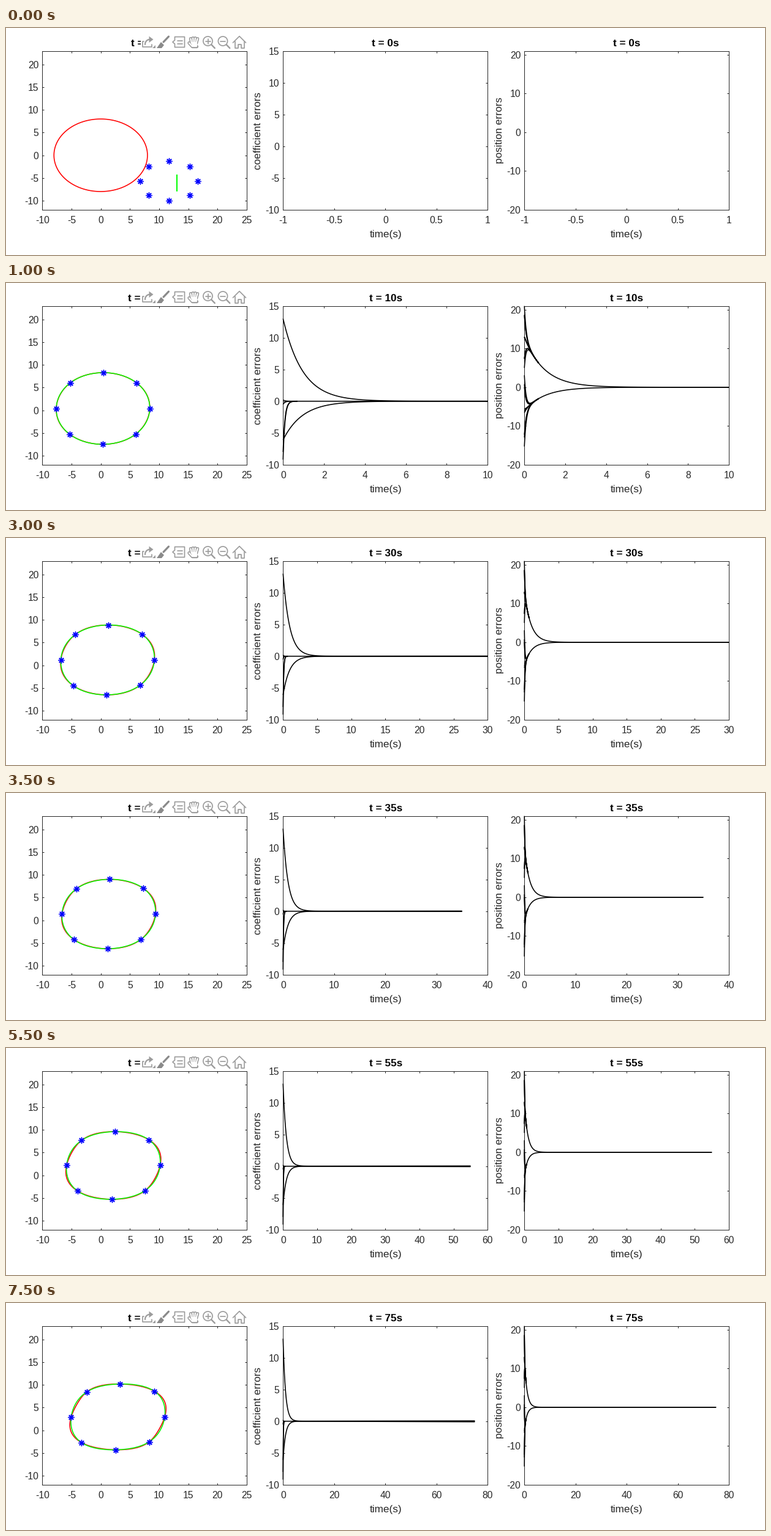
Animation of 1239x372 px, one loop 8000 ms. Source, as a matplotlib script:

```python
import math

import matplotlib.pyplot as plt
import numpy as np
from matplotlib.animation import FuncAnimation
from matplotlib.patches import Circle, Polygon, Rectangle

W, H, DPI = 1239, 372, 64
PX = 72 / DPI  # points per pixel
FRAMES, INTERVAL, STEP = 16, 500, 5
INK, GREY = "#262626", "#9c9c9c"
TICK, LABEL, HAIR = 15.6 * PX, 17.1 * PX, .99 * PX

RADIUS = 8
SLOW, FAST = 1.05, 11  # decay rates of the errors
X0, Y0 = 13, -6.1      # initial centre of the estimate
EX, EY = -8, -9.2      # initial errors of its two main coefficients

plt.rcParams.update({
    "font.family": "Liberation Sans",
    "axes.unicode_minus": False,
    "axes.linewidth": HAIR,
    "axes.edgecolor": INK,
    "path.simplify": False,
    "lines.solid_capstyle": "butt",
})

fig = plt.figure(figsize=(W / DPI, H / DPI), dpi=DPI, facecolor="white")


# ---- axes -------------------------------------------------------------
def set_xticks(ax, ticks):
    ax.set_xticks(ticks, [f"{v:g}" for v in ticks])
    plt.setp(ax.get_xticklabels(), va="baseline")


def panel(left, ylim, yticks):
    top, bottom, width = 37.7, 297.7, 333.9
    ax = fig.add_axes([left / W, 1 - bottom / H, width / W, (bottom - top) / H])
    ax.set_facecolor("none")
    ax.set_ylim(*ylim)
    ax.set_yticks(yticks)
    ax.tick_params(direction="in", top=True, right=True, length=3.4 * PX, width=HAIR,
                   color=INK, labelcolor=INK, labelsize=TICK)
    ax.tick_params(axis="x", pad=22.4 * PX)
    ax.tick_params(axis="y", pad=6 * PX)
    return ax


shape_ax = panel(59.2, (-12, 23), range(-10, 21, 5))
coef_ax = panel(452.3, (-10, 15), range(-10, 16, 5))
pos_ax = panel(846.2, (-20, 21), range(-20, 21, 10))
shape_ax.set_xlim(-10, 25)
set_xticks(shape_ax, range(-10, 26, 5))

# overlay in pixel coordinates
top_ax = fig.add_axes([0, 0, 1, 1], zorder=5)
top_ax.set_xlim(0, W)
top_ax.set_ylim(H, 0)
top_ax.axis("off")


def text(x, y, s, **kw):
    kw = {"color": INK, "size": LABEL, "ha": "center", "va": "baseline", **kw}
    return top_ax.text(x, y, s, **kw)


titles = [text(x, 30.2, "", color="black", weight="bold") for x in (226, 619.7, 1013)]
for cx, baseline, name in ((619.7, 416, "coefficient errors"), (1013, 810, "position errors")):
    text(cx, 343, "time(s)")
    text(baseline, 168, name, rotation=90, rotation_mode="anchor")


# ---- toolbar ----------------------------------------------------------
def stroke(pts, width=1.7, color=GREY, closed=False):
    top_ax.add_patch(Polygon(pts, closed=closed, fill=False, ec=color, lw=width * PX,
                             joinstyle="round", capstyle="round", zorder=6))


def fill(pts, color=GREY):
    top_ax.add_patch(Polygon(pts, fc=color, ec="none", zorder=6))


def share(x):
    stroke([(x - 7, 22), (x - 9, 22), (x - 9, 31), (x + 6, 31), (x + 6, 27)])
    a = np.linspace(0, np.pi / 2, 9)
    stroke(np.c_[x + 3 - 7.5 * np.cos(a), 27 - 8.2 * np.sin(a)], 2.2)
    fill([(x + 2, 13.5), (x + 9, 18.8), (x + 2, 24)])
    fill([(x + 7, 33), (x + 12, 33), (x + 12, 28)])


def brush(x):
    stroke([(x, 23), (x + 8.5, 14)], 3.2, "#8a8a8a")
    fill([(x - 4, 23), (x + 1, 28), (x - 3, 33), (x - 11, 33)], "#8a8a8a")


def data_tip(x):
    stroke([(x, 14.5), (x + 16, 14.5), (x + 16, 31.5), (x, 31.5),
            (x, 26), (x - 3.5, 23), (x, 20)], closed=True)
    for y in (20.5, 25.5):
        stroke([(x + 4, y), (x + 12.5, y)])


def hand(x):
    # wide grey strokes under narrow white ones leave an outline
    for width, color in ((5.4, GREY), (2.2, "white")):
        for k in range(4):
            stroke([(x - 3 + 2.5 * k, 25), (x - 4.5 + 3.7 * k, 16 + abs(k - 1.5))], width, color)
        stroke([(x - 7, 24.5), (x - 2, 30)], width, color)
        fill([(x - 4, 23), (x + 6, 23), (x + 6, 30), (x - 2, 30)], color)
        stroke([(x - 2, 30), (x + 5, 30)], width, color)


def magnifier(x, plus):
    top_ax.add_patch(Circle((x, 21.5), 7.6, fill=False, ec=GREY, lw=1.7 * PX, zorder=6))
    stroke([(x + 5.8, 27.3), (x + 11.3, 33)], 2.4)
    stroke([(x - 4, 21.5), (x + 4, 21.5)])
    if plus:
        stroke([(x, 17.5), (x, 25.5)])


def home(x):
    stroke([(x - 10.5, 24), (x, 13.5), (x + 10.5, 24)])
    for side in (-1, 1):
        stroke([(x + side * dx, y) for dx, y in
                ((7.5, 22), (7.5, 33), (2.5, 33), (2.5, 26.5), (0, 26.5))])


top_ax.add_patch(Rectangle((220, 11), 173, 25, fc="white", ec="none", zorder=5))
share(231.5)
brush(257)
data_tip(275.5)
hand(306)
magnifier(329.5, True)
magnifier(354, False)
home(381)


# ---- model ------------------------------------------------------------
def contour(a, t):
    """Circle that drifts diagonally and slowly deforms."""
    s = t / 75
    c, c3, n, n3 = np.cos(a), np.cos(3 * a), np.sin(a), np.sin(3 * a)
    x = RADIUS * c + s * (2.95 + .1 * (c - c3) + .52 * n + .13 * n3)
    y = RADIUS * n + s * (2.95 + .05 * (c - c3) - .43 * n + .31 * n3)
    return x, y


def true_contour(a, t):
    """Adds the detail between the agents that the estimate misses."""
    x, y = contour(a, t)
    d = t / 75 * np.sin(4 * a)
    return x + .28 * d * np.cos(a), y + .1 * d * np.sin(a)


def estimate(a, t):
    x, y = contour(a, t)
    slow, fast = math.exp(-SLOW * t), math.exp(-FAST * t)
    return x + X0 * slow + EX * fast * np.cos(a), y + Y0 * slow + (EY + 3) * fast * np.sin(a)


def agent_positions(t):
    if t == 0:
        return 11.7 + 4.95 * np.cos(agents), -5.65 + 4.43 * np.sin(agents)
    return estimate(agents, t)


def coef_error(start, rate, drift):
    return lambda t: start * np.exp(-rate * t) + drift * t / 75


def pos_error(centre, spread):
    return lambda t: centre * np.exp(-SLOW * t) + spread * np.exp(-FAST * t)


angles = np.linspace(0, 2 * np.pi, 361)
agents = np.arange(8) * np.pi / 4
grid = np.linspace(0, 1, 700) ** 3

# curves drawn over the whole time, and transients that soon merge with them
coef_long = [coef_error(X0, SLOW, .05), coef_error(Y0, SLOW, 0), coef_error(EX, FAST, -.1)]
coef_short = [coef_error(v, FAST, 0) for v in (EY, .2, -.5)]
pos_long = [pos_error(X0, 0), pos_error(Y0, 0)]
pos_short = ([pos_error(X0, EX * math.cos(a)) for a in agents]
             + [pos_error(Y0, EY * math.sin(a) - .5 * math.cos(a)) for a in agents])

LINE = {"lw": 1.6 * PX, "zorder": 3}
red, = shape_ax.plot([], [], color="#ff0000", **LINE)
green, = shape_ax.plot([], [], color="#00ff00", **LINE)
stars, = shape_ax.plot([], [], ls="none", marker=(8, 2, 0), ms=10.2 * PX,
                       mew=1.4 * PX, mec="#0000ff", zorder=4)


def curves(ax, funcs, end):
    return [(ax.plot([], [], color="black", clip_on=False, **LINE)[0], f, end) for f in funcs]


error_curves = (curves(coef_ax, coef_long, math.inf) + curves(coef_ax, coef_short, .7)
                + curves(pos_ax, pos_long, math.inf) + curves(pos_ax, pos_short, .7))


def time_axis(t):
    if t == 0:
        return -1, 1, .5
    step = next(s for s, end in ((1, 5), (2, 10), (5, 30), (10, 60), (20, 100)) if t <= end)
    return 0, math.ceil(t / step) * step, step


def draw(i):
    t = i * STEP
    for title in titles:
        title.set_text(f"t = {t}s")

    red.set_data(*true_contour(angles, t))
    green.set_data(*estimate(angles, t))
    stars.set_data(*agent_positions(t))

    lo, hi, step = time_axis(t)
    for ax in (coef_ax, pos_ax):
        ax.set_xlim(lo, hi)
        set_xticks(ax, np.arange(lo, hi + step / 2, step))
    for line, f, end in error_curves:
        times = grid * min(t, end)
        line.set_data(times, f(times))
        line.set_visible(t > 0)
    return [red, green, stars]


anim = FuncAnimation(fig, draw, frames=FRAMES, interval=INTERVAL, repeat=True, blit=False)
plt.show()
```
